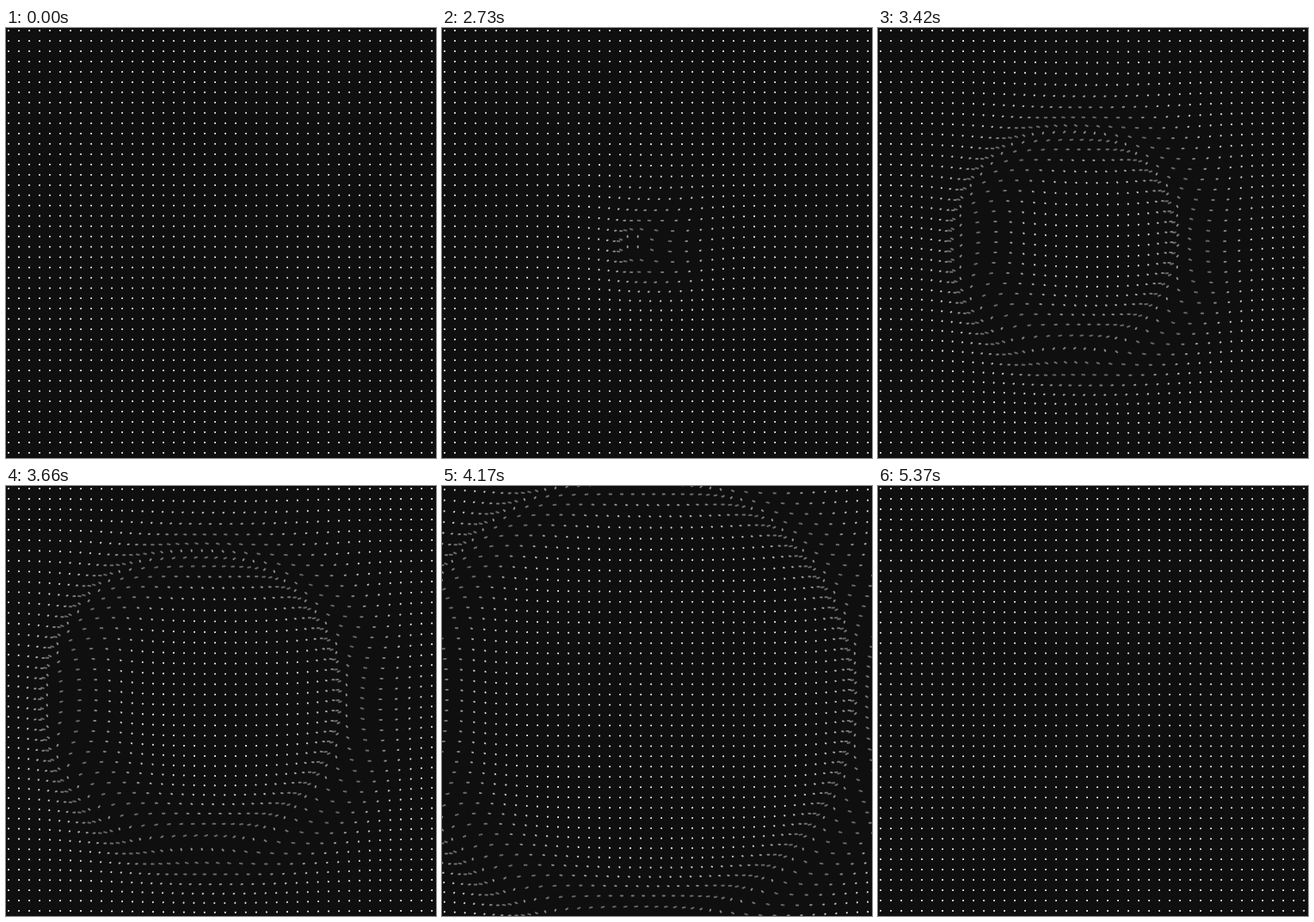
Write an HTML page with a canvas that moves like this. It is 500 by 500 pixels and loops after 5.4 s.

```html
<!DOCTYPE html>
<html lang="en">
<head>
<meta charset="utf-8">
<title>Dot ripple</title>
<style>
  html, body { margin: 0; width: 100%; height: 100%; overflow: hidden; background: #0f0f0f; }
  canvas { display: block; }
</style>
</head>
<body>
<canvas id="stage" width="500" height="500"></canvas>
<script>
const ctx = document.getElementById('stage').getContext('2d');

const LOOP = 5400;      // ms
const TRAVEL = 1940;    // time one dot needs for its orbit
const START = 1713;     // when the centre dot sets off
const SPEED = 0.177;    // wave front, px per ms
const SHUTTER = 20;     // motion blur window, ms
const ORIGIN = 3, STEP_X = 12.005, STEP_Y = 11.975, COUNT = 42, MARGIN = 3;
const MIDDLE = (COUNT - 1) / 2;

const dots = [];
for (let row = -MARGIN; row < COUNT + MARGIN; row++) {
  for (let col = -MARGIN; col < COUNT + MARGIN; col++) {
    const radius = Math.hypot((col - MIDDLE) * STEP_X, (row - MIDDLE) * STEP_Y);
    dots.push({
      x: ORIGIN + col * STEP_X,
      y: ORIGIN + row * STEP_Y,
      delay: START + radius / SPEED
    });
  }
}

const easeInOutQuart = u => u < 0.5 ? 8 * u ** 4 : 1 - 8 * (1 - u) ** 4;

// A flat loop: down, far to the left, up and back again.
function position(dot, time) {
  const local = (((time - dot.delay) % LOOP) + LOOP) % LOOP;
  const angle = 2 * Math.PI * easeInOutQuart(Math.min(local / TRAVEL, 1));
  const swing = Math.max(0, Math.sin(angle / 2)) ** 2.8;
  return [dot.x - 27.5 * swing, dot.y + 5.5 * Math.sin(angle)];
}

function draw(time) {
  ctx.globalAlpha = 1;
  ctx.fillStyle = '#0f0f0f';
  ctx.fillRect(0, 0, 500, 500);
  ctx.strokeStyle = '#fff';
  ctx.lineWidth = 2;
  ctx.lineCap = 'round';
  for (const dot of dots) {
    const [x0, y0] = position(dot, time - SHUTTER / 2);
    const [x1, y1] = position(dot, time + SHUTTER / 2);
    const length = Math.hypot(x1 - x0, y1 - y0);
    // A smeared dot keeps the same total light.
    ctx.globalAlpha = Math.PI / (Math.PI + 2 * length);
    ctx.beginPath();
    ctx.moveTo(x0, y0);
    ctx.lineTo(x1 + 0.01, y1);
    ctx.stroke();
  }
}

const begin = performance.now();
function frame() {
  draw((performance.now() - begin) % LOOP);
  requestAnimationFrame(frame);
}
frame();
</script>
</body>
</html>
```
